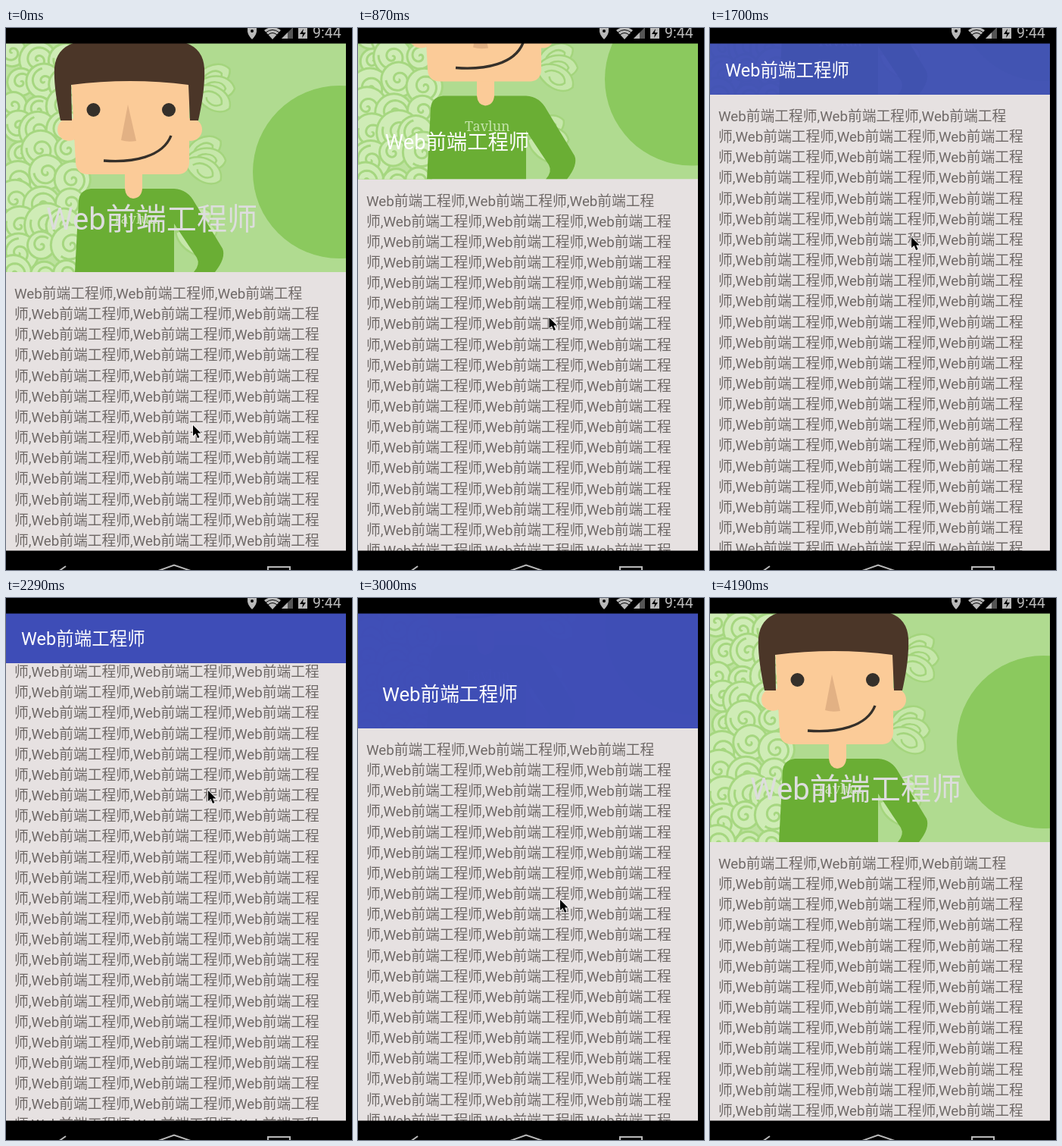
An HTML page with a canvas that plays this animation: 457 px wide and 715 px high, repeating every 4520 ms.

```html
<!DOCTYPE html>
<html lang="zh-CN">
<head>
<meta charset="utf-8">
<style>
html, body { margin: 0; width: 100%; height: 100%; overflow: hidden; background: #000; }
canvas { display: block; }
</style>
</head>
<body>
<canvas id="stage" width="457" height="715"></canvas>
<script>
const ctx = document.getElementById('stage').getContext('2d');
const FONT = 'Roboto, "Noto Sans CJK SC", "Noto Sans CJK", sans-serif';
const TITLE = '\u0057eb前端工程师';
const LINE = '师,' + (TITLE + ',').repeat(2) + TITLE.slice(0, -1);
const LOOP = 4520, LAST = 4190, EXPANDED = 322, COLLAPSED = 86;

// Key poses of the drag; the screen refreshes about every REFRESH ms between them.
const REFRESH = 158;
const POSES = [
  { t: 0, top: 322, y: 524 },
  { t: 580, top: 222, y: 406 },
  { t: 1200, top: 140, y: 322 },
  { t: 1700, top: 88, y: 276 },
  { t: 2290, top: 42, y: 254 },
  { t: 3000, top: 172, y: 398 },
  { t: LAST, top: 322, y: 547 }
];

const clamp = v => Math.max(0, Math.min(1, v));

function speed(i, key) {
  const [a, b, c] = [POSES[i - 1], POSES[i], POSES[i + 1]];
  if (!a || !c) return 0;
  const before = (b[key] - a[key]) / (b.t - a.t), after = (c[key] - b[key]) / (c.t - b.t);
  return before * after > 0 ? 2 * before * after / (before + after) : 0;
}

// Hermite curve through the poses that rests where the drag turns round.
function dragAt(time) {
  const i = POSES.findIndex(p => p.t > time) - 1;
  if (i < 0) return POSES[POSES.length - 1];
  const a = POSES[i], b = POSES[i + 1], span = b.t - a.t;
  const steps = Math.round(span / REFRESH);
  const f = Math.floor((time - a.t) / span * steps) / steps, g = 1 - f;
  const curve = key => a[key] * g * g * (1 + 2 * f) + b[key] * f * f * (1 + 2 * g)
    + span * f * g * (speed(i, key) * g - speed(i + 1, key) * f);
  return { t: a.t + f * span, top: curve('top'), y: curve('y') };
}

function seeded(seed) {
  return () => (seed = seed * 16807 % 2147483647) / 2147483647;
}

function fill(color, d) {
  ctx.fillStyle = color;
  ctx.fill(new Path2D(d));
}

function stroke(color, width, d) {
  ctx.strokeStyle = color;
  ctx.lineWidth = width;
  ctx.stroke(new Path2D(d));
}

function rect(color, x, y, w, h) {
  ctx.fillStyle = color;
  ctx.fillRect(x, y, w, h);
}

function disc(color, x, y, r) {
  ctx.fillStyle = color;
  ctx.beginPath();
  ctx.arc(x, y, r, 0, 7);
  ctx.fill();
}

function text(str, x, y, size, color, family = FONT) {
  ctx.font = size + 'px ' + family;
  ctx.fillStyle = color;
  ctx.fillText(str, x, y);
}

function clipped(top, bottom, draw) {
  ctx.save();
  ctx.beginPath();
  ctx.rect(0, top, 449, bottom - top);
  ctx.clip();
  draw();
  ctx.restore();
}

function swirl(x, y, r, turn) {
  disc('#a6d780', x, y, r + 3);
  disc('#cfecb6', x, y, r);
  ctx.beginPath();
  for (let q = 0; q < r * 0.8; q += 0.4) {
    const a = turn + q * 0.58;
    ctx.lineTo(x + q * Math.cos(a), y + q * Math.sin(a));
  }
  ctx.strokeStyle = '#a6d780';
  ctx.lineWidth = 3;
  ctx.stroke();
}

function leafFan(x, y) {
  for (let i = -1; i <= 1; i++) {
    ctx.save();
    ctx.translate(x, y);
    ctx.rotate(i * 0.5);
    const outline = 'M0 0C12 -22 48 -22 54 0C48 18 14 18 0 0Z';
    fill('#c6e7aa', outline);
    stroke('#a4d57d', 2.5, outline + 'M12 0C20 -12 38 -11 42 0C38 9 24 9 20 2');
    ctx.restore();
  }
}

function drawPattern() {
  const random = seeded(77);
  rect('#b0db90', 0, 20, 449, 302);
  rect('#bde29f', 0, 20, 92, 302);
  for (let y = 30; y < 330; y += 32)
    for (let x = 8; x < 90; x += 34)
      swirl(x + random() * 12, y + random() * 14, 15 + random() * 13, random() * 6);
  for (let y = 80; y < 330; y += 95) leafFan(258 - y / 8, y);
}

function drawMan() {
  const skin = '#fbcb98', dark = '#35302a';
  fill('#6aae34', 'M112 212H222Q240 213 249 230L286 291Q291 303 276 322H248Q257 312 252 303L222 258V322H91L96 228Q97 214 112 212Z');
  text('Tavlun', 141, 258, 18, '#c4e3aa', '"Noto Serif", serif');
  fill(skin, 'M157 188H180V212Q179 224 168 225Q158 224 157 212Z');
  disc(skin, 83, 134, 15);
  disc(skin, 244, 134, 15);
  fill(skin, 'M86 66H242V178Q241 192 228 193H107Q93 192 92 178Z');
  fill('#4b3628', 'M72 122C66 92 63 70 64 52Q67 24 96 18H231Q260 24 262 53C263 75 259 100 254 122H243L241 75Q164 65 86 75L87 122Z');
  disc(dark, 115.5, 108, 9);
  disc(dark, 215, 108, 9);
  fill('#e2b184', 'M161 101L172 149Q161 151 152 148Z');
  stroke(dark, 3.4, 'M129 175C168 178 207 170 218 142');
}

function drawHeader(h, t) {
  const open = (h - COLLAPSED) / (EXPANDED - COLLAPSED);
  clipped(20, h, () => {
    ctx.save();
    ctx.translate(0, h - EXPANDED);
    drawPattern();
    disc('#8bc95e', 440, 190, 114);
    drawMan();
    ctx.restore();
    ctx.globalAlpha = clamp((t - 1230) / 500) * (1 - clamp((t - 2990) / 600));
    rect('#3e4db7', 0, 20, 449, h - 20);
    ctx.globalAlpha = 1;
    const tone = 255 - 34 * open ** 4;
    text(TITLE, 20 + 33 * open, 62 + 204 * open, 23.5 + 16.6 * open ** 2, `rgb(${tone},${tone},${tone})`);
  });
}

function drawContent(top) {
  rect('#e6e1e1', 0, 20, 449, 670);
  clipped(20, 690, () => {
    for (let i = 0, y = top + 35; y < 710; i++, y += 27.15)
      text(i ? LINE : LINE.slice(2), 11, y, 18.75, '#6f6967');
  });
}

function drawSystemBars() {
  const grey = '#b9b9b9';
  rect('#000', 0, 0, 457, 20.5);
  rect('#000', 449, 0, 8, 715);
  rect('#000', 0, 689.5, 457, 26);
  fill(grey, 'M319 0H331V5Q330 10 325 15Q320 10 319 5Z');
  disc('#000', 325, 4, 2);
  fill(grey, 'M341 3Q352 -5 363 3L352 15Z');
  stroke('#000', 1, 'M343 6Q352 -1 361 6M346 9Q352 4 358 9');
  fill('#555', 'M364 14L379 -1V14Z');
  fill(grey, 'M364 14L372 6V14Z');
  rect(grey, 386, 0, 12, 14);
  fill('#000', 'M393 1L388 8H392L391 13L396 6H392Z');
  text('9:44', 405, 13, 19.5, grey);
  stroke(grey, 2, 'M69 717L79 710M201 716L222 708.5L244 716M346 716V711H375V716');
}

function drawCursor(x, y) {
  ctx.save();
  ctx.translate(x, y);
  const arrow = 'M0 0V14L3.5 11L6 17L8.5 16L6 10.5H10.5Z';
  stroke('#fff', 1.5, arrow);
  fill('#000', arrow);
  ctx.restore();
}

function render(time) {
  const { t, top, y } = dragAt(time);
  drawContent(top);
  drawHeader(Math.max(COLLAPSED, top), t);
  drawSystemBars();
  if (t < LAST) drawCursor(247 + 20 * clamp(t / 1750) ** 1.5, y);
}

const start = performance.now();
function loop() {
  render((performance.now() - start) % LOOP);
  requestAnimationFrame(loop);
}
loop();
</script>
</body>
</html>
```
